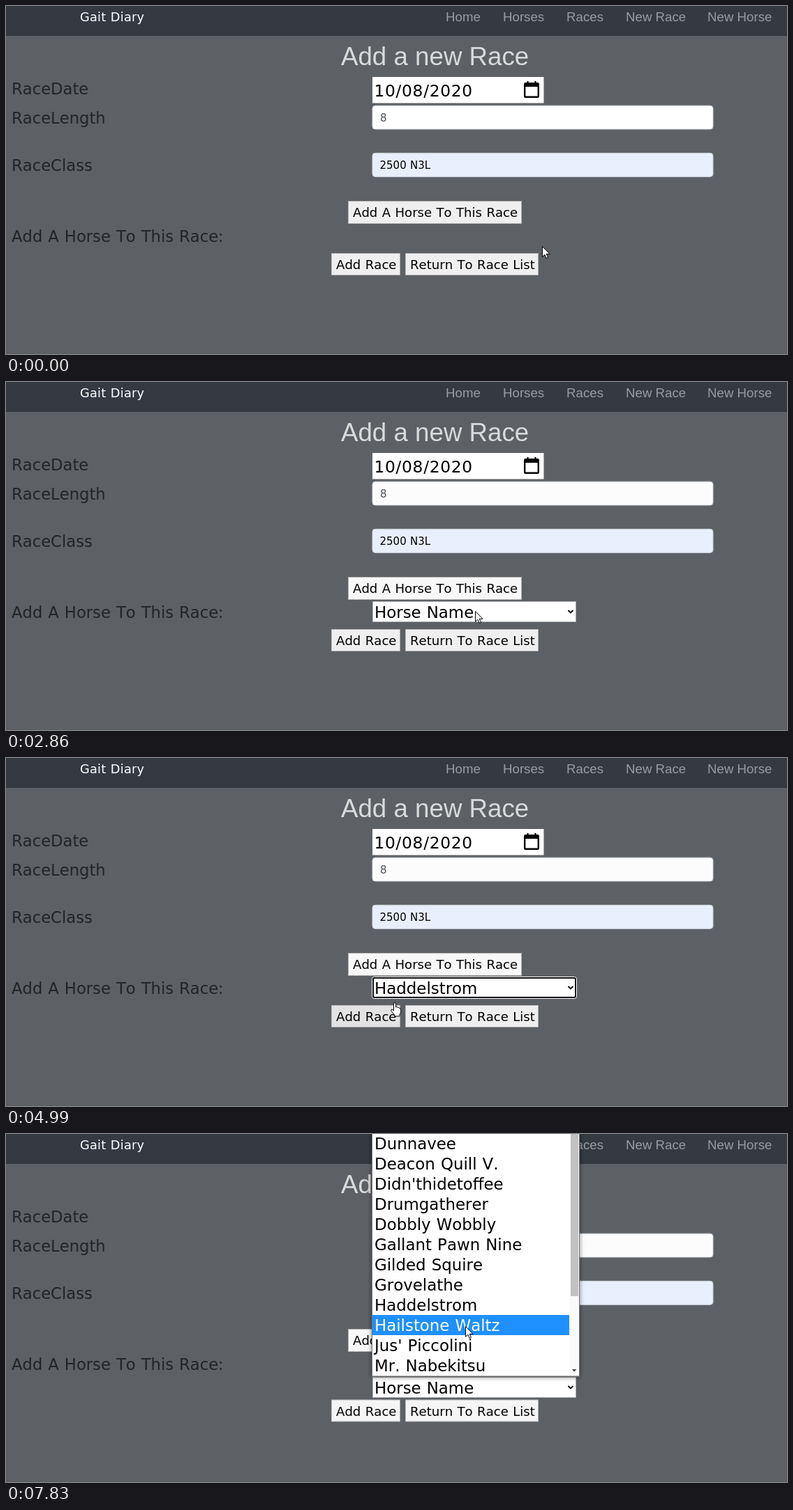
An HTML page that plays this animation: 1119x500 px, repeating every 8 s.

```html
<!DOCTYPE html>
<html lang="en">
<head>
<meta charset="utf-8">
<title>Add a new Race</title>
<style>
  html, body { margin: 0; width: 100%; height: 100%; overflow: hidden; background: #5d6064; }
  svg { display: block; width: 1119px; height: 500px; }
  text { font-family: "DejaVu Sans", Verdana, sans-serif; font-kerning: none; white-space: pre; word-spacing: .035em; }
  .sans text, text.sans { font-family: "Liberation Sans", Arial, sans-serif; word-spacing: 0; }
  .nav { font-size: 18.7px; fill: #999c9f; }
  .label { font-size: 22.7px; fill: #212529; }
  .field { font-size: 22.9px; }
  .input { font-size: 15px; }
  .button text { font-size: 18.1px; }
  .button rect, .select .box { stroke: #b4b4b5; stroke-width: 1; }
</style>
</head>
<body>
<svg id="stage" viewBox="0 0 1119 500">
  <defs>
    <clipPath id="listClip"><rect x="525" y="-40" width="282" height="353"/></clipPath>
    <filter id="shadow" x="-10%" y="-10%" width="120%" height="120%">
      <feDropShadow dx="0" dy="1" stdDeviation="3" flood-color="#000" flood-opacity=".5"/>
    </filter>
  </defs>
  <rect width="1119" height="500" fill="#5d6064"/>
  <rect width="1119" height="43" fill="#343a40"/>
  <text x="106" y="22" font-size="17.8" letter-spacing=".2" fill="#fff">Gait Diary</text>
  <g class="nav sans" id="nav"></g>
  <text class="sans" x="480" y="85" font-size="36.7" fill="#d9dadb">Add a new Race</text>
  <g class="label" id="labels"></g>

  <rect x="525" y="102" width="245.500" height="37.500" fill="#fff"/>
  <text x="527.500" y="130" font-size="23.3" letter-spacing=".7">10/08/2020</text>
  <g fill="none" stroke="#000" stroke-width="2.400">
    <rect x="743.200" y="111.200" width="19.600" height="19.600" rx="1"/>
    <path d="M743 113.500H763" stroke-width="5"/>
    <path d="M747.500 108v4M758.500 108v4"/>
  </g>
  <g stroke="#ced4da">
    <rect id="lengthInput" x="525" y="143.200" width="488" height="33.800" rx="4" fill="#fff"/>
    <rect x="525" y="211.300" width="488" height="34" rx="4" fill="#e8f0fe"/>
  </g>
  <text class="input" x="536" y="166" fill="#495057">8</text>
  <text class="input" x="535.500" y="234.300">2500 N3L</text>

  <g id="controls"></g>

  <g id="popup">
    <rect x="524.500" y="-40" width="297" height="354" fill="#fff" stroke="#767676" filter="url(#shadow)"/>
    <rect x="808" y="-40" width="13" height="353" fill="#fafafa"/>
    <rect id="thumb" x="809" y="-40" width="11" fill="#c1c1c1"/>
    <path d="M811 304h6.500l-3.250 3.500z" fill="#404040"/>
    <g clip-path="url(#listClip)">
      <rect id="highlight" x="525" width="282" height="29" fill="#1e90ff"/>
      <g id="items" class="field"></g>
    </g>
  </g>

  <path id="arrow" d="M.5 .5V15.300L3.900 12.200 6.200 17.300 8.500 16.300 6.200 11.300H11Z" fill="#fff" stroke="#000"/>
  <path id="hand" d="M4.500 12V2.200Q4.500 .6 6 .6T7.500 2.200V7Q9.800 5.800 10.300 7.700 12.300 6.800 12.700 8.700 14.600 8.200 14.600 10.300V14.500L13 17.500V20H5.500V18L1 12.500Q.2 10.300 2 10Z" fill="#fff" stroke="#000"/>
</svg>
<script>
const LOOP = 8000;
const ROW = 29;
const ADDED = 34;
const $ = id => document.getElementById(id);

function make(parent, tag, attrs = {}, content = "") {
  const el = document.createElementNS("http://www.w3.org/2000/svg", tag);
  for (const key in attrs) el.setAttribute(key, attrs[key]);
  el.textContent = content;
  parent.append(el);
  return el;
}
const set = (el, attrs) => { for (const key in attrs) el.setAttribute(key, attrs[key]); };
const show = (el, on) => set(el, { visibility: on ? "inherit" : "hidden" });
const move = (el, x, y) => set(el, { transform: `translate(${x} ${y})` });

[[630, "Home"], [712, "Horses"], [803, "Races"], [888, "New Race"], [1005, "New Horse"]]
  .forEach(([x, word]) => make($("nav"), "text", { x, y: 21.5 }, word));
[[127, "RaceDate"], [168.5, "RaceLength"], [237, "RaceClass"], [339, "Add A Horse To This Race:"]]
  .forEach(([y, word]) => make($("labels"), "text", { x: 8, y }, word));

function makeButton(x, y, width, height, label) {
  const group = make($("controls"), "g", { class: "button" });
  const face = make(group, "rect", { x: x + .5, y: y + .5, width: width - 1, height: height - 1 });
  make(group, "text", { x: x + 7, y: y + 23 }, label);
  return { x, y, width, height, group, face };
}
const addHorse = makeButton(490, 280, 249, 33, "Add A Horse To This Race");
const addRace = makeButton(466, 355, 99, 32, "Add Race");
const goBack = makeButton(572, 355, 191, 32, "Return To Race List");

function makeSelect(y) {
  const group = make($("controls"), "g", { class: "select", transform: `translate(0 ${y})` });
  const box = make(group, "rect", { class: "box", x: 525.5, y: .5, width: 291, height: 29, fill: "#fff" });
  const ring = make(group, "g", { fill: "none" });
  make(ring, "rect", { x: 524.5, y: -.5, width: 293, height: 31, rx: 3, stroke: "#fff" });
  make(ring, "rect", { x: 526, y: 1, width: 290, height: 28, rx: 2, stroke: "#101010", "stroke-width": 2 });
  const value = make(group, "text", { class: "field", x: 528, y: 23.5 }, "Horse Name");
  make(group, "path", { d: "M805.500 13l3.500 3.500 3.500-3.500", fill: "none", stroke: "#000", "stroke-width": 1.8 });
  return { group, box, ring, value };
}
const firstSelect = makeSelect(315);
const secondSelect = makeSelect(315 + ADDED);

// Listed from the bottom of the menu upwards.
const horses = ["Mr. Nabekitsu", "Jus' Piccolini", "Hailstone Waltz", "Haddelstrom", "Grovelathe",
  "Gilded Squire", "Gallant Pawn Nine", "Dobbly Wobbly", "Drumgatherer", "Didn'thidetoffee",
  "Deacon Quill V.", "Dunnavee", "Crumbsonmydadsapron"];
const rows = horses.map((name, i) => make($("items"), "text", { x: 528, y: 307 - ROW * i }, name));

// Pointer stops: time, x, y.
const stops = [
  [0, 768, 345], [400, 755, 341], [520, 737, 337], [670, 726, 318], [790, 714, 305],
  [910, 706, 299], [1030, 702, 297], [1290, 698, 303], [1420, 684, 318], [1570, 672, 329],
  [3230, 663, 263], [3480, 656, 243], [3600, 651, 224], [3720, 650, 221],
  [4490, 655, 284], [4630, 668, 325], [4750, 655, 383], [4870, 575, 392], [4990, 557, 356],
  [5110, 557, 325], [5230, 562, 308], [5350, 566, 298], [5710, 572, 299], [5830, 585, 301],
  [5980, 600, 315], [6100, 622, 342], [6250, 632, 352], [6370, 635, 358], [6490, 636, 361],
  [7420, 664, 333], [7560, 660, 304], [7680, 658, 276]
];

function drawPopup(open, shift, y) {
  show($("popup"), open);
  if (!open) return;
  const bottom = 313 + shift;
  const inside = y < bottom;
  const picked = inside ? Math.floor((bottom - y) / ROW) : -1;
  move($("popup"), 0, shift);
  move($("items"), 0, inside ? 0 : 20);
  show($("highlight"), inside);
  set($("highlight"), { y: 313 - ROW * (picked + 1) });
  set($("thumb"), { height: 246 - (inside ? 0 : 14) - (shift ? 7 : 0) });
  rows.forEach((row, i) => set(row, { fill: i === picked ? "#fff" : "#000" }));
}

function draw(t) {
  const [, x, y] = stops.findLast(stop => stop[0] <= t);
  const within = (from, to) => t >= from && t < to;
  const firstOpen = within(2980, 4370);
  const secondOpen = t >= 6770;
  const added = t >= 5590;
  const drop = added ? 26.5 : 0;
  const pressed = within(1170, 1290) || within(5470, 5590);

  set($("lengthInput"), { fill: t < 1170 ? "#fff" : "#fcfcfd" });
  show(firstSelect.group, t >= 1290);
  show(secondSelect.group, added);
  show(firstSelect.ring, within(4370, 5470));
  show(secondSelect.ring, false);
  set(firstSelect.box, { fill: t < 2860 ? "#f6f6f7" : "#fff" });
  firstSelect.value.textContent = t < 4370 ? "Horse Name" : horses[3];

  let hovering = false;
  for (const button of [addHorse, addRace, goBack]) {
    const offset = button === addHorse ? 0 : drop;
    const top = button.y + offset;
    const hit = !firstOpen && !secondOpen && x >= button.x && x < button.x + button.width
      && y >= top && y < top + button.height;
    const rest = button === addHorse ? (t < 1170 ? "#efefef" : "#f8f8f9") : (added ? "#f5f5f6" : "#efefef");
    set(button.face, { fill: !hit ? rest : pressed ? "#f5f5f5" : "#e3e3e3" });
    move(button.group, 0, offset);
    hovering ||= hit;
  }

  drawPopup(firstOpen || secondOpen, secondOpen ? ADDED : 0, y);
  show($("arrow"), !hovering);
  show($("hand"), hovering);
  move($("arrow"), x, y);
  move($("hand"), x - 6, y - 5);
}

const start = performance.now();
function tick() {
  draw((performance.now() - start) % LOOP);
  requestAnimationFrame(tick);
}
tick();
</script>
</body>
</html>
```
